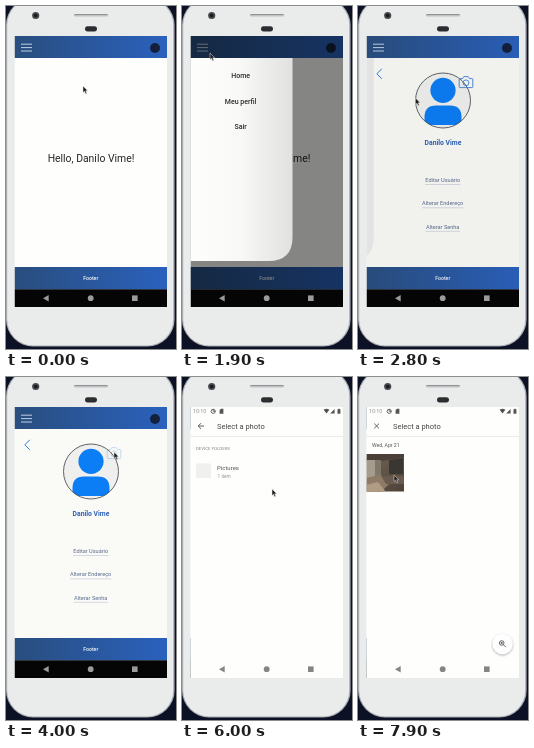
An HTML page that plays this animation: 170 by 343 pixels, repeating every 8000 ms.

```html
<!DOCTYPE html>
<html lang="pt">
<head>
<meta charset="utf-8">
<title>Phone app</title>
<style>
html, body { margin: 0; width: 100%; height: 100%; overflow: hidden; background: #0c1126; }
svg { display: block; width: 170px; height: 343px; }
text { font-family: Roboto, sans-serif; text-anchor: middle; }
.left { text-anchor: start; }
.menu { font-size: 7px; font-weight: 500; fill: #2b2b2b; }
.link { font-size: 5.6px; fill: #56688c; }
</style>
</head>
<body>
<svg viewBox="0 0 170 343" xmlns="http://www.w3.org/2000/svg">
<defs>
  <linearGradient id="bar"><stop offset="0" stop-color="#294e7e"/><stop offset="1" stop-color="#2a61bd"/></linearGradient>
  <linearGradient id="sheet"><stop offset="0" stop-color="#fefefc"/><stop offset=".5" stop-color="#f8f8f6"/><stop offset="1" stop-color="#e0e1e0"/></linearGradient>
  <linearGradient id="wall" x2="1" y2="1"><stop offset="0" stop-color="#71665a"/><stop offset="1" stop-color="#4d4036"/></linearGradient>
  <filter id="soft" x="-50%" y="-50%" width="200%" height="200%"><feGaussianBlur stdDeviation="1.2"/></filter>
  <clipPath id="screen"><rect x="8.5" y="30" width="152.5" height="271"/></clipPath>
  <clipPath id="face"><circle cx="85" cy="94.5" r="27.5"/></clipPath>
  <clipPath id="shot"><rect x="8.5" y="77" width="37.5" height="37.5"/></clipPath>
  <g id="keys">
    <path d="M37 292.3l5.7-3.3v6.6z"/><circle cx="84.7" cy="292.2" r="2.9"/><rect x="126" y="289.4" width="5.6" height="5.6"/>
  </g>
</defs>

<!-- phone body -->
<rect width="170" height="343" fill="#0c1126"/>
<rect x="0" y="-8" width="168.6" height="348.5" rx="27" fill="#a9acb0"/>
<rect x="1.2" y="-7" width="166" height="346.5" rx="26" fill="#eaecec"/>
<circle cx="29.7" cy="9.5" r="3.6" fill="#45484c"/>
<circle cx="29.7" cy="9.5" r="1.8" fill="#17191d"/>
<rect x="68" y="8" width="34" height="2.6" rx="1.3" fill="#bfc2c3"/>
<rect x="68.5" y="8" width="33" height="1" rx=".5" fill="#8f9294"/>
<rect x="79" y="20.2" width="12" height="5.2" rx="2.6" fill="#2b2d31"/>

<g clip-path="url(#screen)">
  <rect x="8.5" y="30" width="152.5" height="271" fill="#fefefc"/>
  <g id="home">
    <text x="85" y="156.3" font-size="10.4" fill="#262626">Hello, Danilo Vime!</text>
  </g>
  <g id="profile">
    <rect x="8.5" y="52" width="152.5" height="209" fill="#fafaf7"/>
    <path d="M23.8 62.8l-4.9 5 4.9 5" fill="none" stroke="#2f7be0"/>
    <circle cx="85" cy="94.5" r="27.5" fill="#efefee"/>
    <g clip-path="url(#face)" fill="#0b7df5">
      <circle cx="85" cy="84.3" r="12.6"/>
      <path d="M66.5 119V111Q66.5 99.5 78 99.5H92Q103.5 99.5 103.5 111V119z"/>
    </g>
    <circle cx="85" cy="94.5" r="27.5" fill="none" stroke="#3c4048" stroke-width=".8"/>
    <g id="camera" fill="none" stroke="#3a7fd6" stroke-width=".9">
      <path d="M102 72.6h2.6l1.2-2h4.4l1.2 2h2.6q.8 0 .8.8v7.4q0 .8-.8.8h-12q-.8 0-.8-.8v-7.4q0-.8.8-.8z"/>
      <circle cx="108" cy="76.8" r="2.9"/>
    </g>
    <text x="85" y="139.3" font-size="6.8" font-weight="700" fill="#2f62b5">Danilo Vime</text>
    <text class="link" x="84.7" y="176">Editar Usuário</text>
    <text class="link" x="84.7" y="199.3">Alterar Endereço</text>
    <text class="link" x="84.7" y="222.8">Alterar Senha</text>
    <path d="M67 178.5h35.5M64 201.8h41.5M67.5 225.3h34.5" stroke="#bcc3d0" stroke-width=".6"/>
  </g>
  <rect x="8.5" y="30" width="152.5" height="22" fill="url(#bar)"/>
  <path id="burger" d="M15 38.2h11M15 41.6h11M15 45h11" stroke="#d3dced" stroke-width=".9"/>
  <circle cx="149" cy="42" r="5" fill="#14213d"/>
  <rect x="8.5" y="261" width="152.5" height="22.5" fill="url(#bar)"/>
  <text x="84.7" y="274.2" font-size="5.2" font-weight="500" fill="#f4f7fb">Footer</text>
  <rect id="shade" x="8.5" y="30" width="152.5" height="253.5"/>
  <g id="drawer">
    <path d="M8.5 52H110.5V231q0 24-24 24H8.5z" fill="url(#sheet)"/>
    <text class="menu" x="58.6" y="71.5">Home</text>
    <text class="menu" id="perfil" x="58.6" y="97.5">Meu perfil</text>
    <text class="menu" x="58.6" y="123.3">Sair</text>
  </g>
  <rect x="8.5" y="283.3" width="152.5" height="18" fill="#050505"/>
  <use href="#keys" fill="#9b9b9b"/>

  <g id="picker">
    <rect x="8.5" y="30" width="152.5" height="271.5" fill="#fefefd"/>
    <text class="left" x="11" y="36.3" font-size="5.3" fill="#8c8c8c">10:10</text>
    <g fill="none" stroke="#5b5b5b" stroke-width=".9">
      <circle cx="31.2" cy="34.3" r="2.1"/><path d="M31.2 34.3h2.2M31.2 32v2.3"/>
    </g>
    <g fill="#555">
      <path d="M37.6 33l1.4-1.3h2.4v5h-3.8z"/>
      <path d="M141.6 32.7q2.9-2 5.8 0l-2.9 3.8zM148.2 36.6h4.4v-4.5zM155.5 32.3h.8v-.6h1.3v.6h.8v4.4h-2.9z"/>
    </g>
    <g id="title">
      <path id="back" d="M22 49h-5.8m2.8-2.8l-2.8 2.8 2.8 2.8" fill="none" stroke="#505050" stroke-width=".9"/>
      <path id="close" d="M16.2 46.6l4.8 4.8m0-4.8l-4.8 4.8" stroke="#505050" stroke-width=".9"/>
      <text class="left" x="35" y="51.8" font-size="7.5" fill="#454545">Select a photo</text>
    </g>
    <path id="rule" d="M8.5 59.4H161" stroke="#e6e6e4" stroke-width=".8"/>
    <g id="folders">
      <rect id="row" x="8.5" y="80" width="152.5" height="28.7" fill="#dedfdc"/>
      <text class="left" x="14" y="73.2" font-size="4.35" fill="#858585">DEVICE FOLDERS</text>
      <rect x="14" y="86.5" width="15" height="14.5" rx=".8" fill="#f0f0ee"/>
      <text class="left" x="35" y="92.8" font-size="6" fill="#555">Pictures</text>
      <text class="left" x="35.6" y="101.3" font-size="4.7" fill="#8f8f8f">1 item</text>
    </g>
    <g id="photos">
      <text class="left" x="14" y="70.3" font-size="5.2" fill="#555">Wed, Apr 21</text>
      <g id="photo" clip-path="url(#shot)">
        <rect x="8" y="77" width="39" height="38" fill="url(#wall)"/>
        <path d="M8 77h39v3l-24 4H8z" fill="#4a4038"/>
        <path d="M8 83h9v18H8z" fill="#a59c8e"/>
        <path d="M17 83h6v17h-6z" fill="#80766a"/>
        <path d="M31 83l14-2v16H31z" fill="#3a3732"/>
        <path d="M8 101l13-3 10 3v6l-8 8H8z" fill="#8e7b67"/>
        <path d="M23 99h23v8H28z" fill="#6a5a4d"/>
        <path d="M8 108l12-3 8 10H8z" fill="#b09b84"/>
      </g>
      <circle cx="144.6" cy="268" r="10.4" fill="#000" opacity=".28" filter="url(#soft)"/>
      <circle cx="144.6" cy="267" r="10.3" fill="#fefefe"/>
      <g fill="none" stroke="#555" stroke-width=".9">
        <circle cx="143.7" cy="266" r="2.3"/><path d="M145.4 267.7l2.5 2.5M142.6 266h2.2M143.7 264.9v2.2"/>
      </g>
    </g>
    <use href="#keys" fill="#858585"/>
  </g>
</g>
<path id="cursor" d="M0 0V6.6l1.5-1.3 1.1 2.5 1.2-.5-1.1-2.5h2z" fill="#1c1c1c" stroke="#e8e8e8" stroke-width=".5"/>
</svg>

<script>
const LOOP = 8000, STEP = 100;
const el = {};
document.querySelectorAll('svg [id]').forEach(n => el[n.id] = n);

// Linear interpolation through [time, value] keys
function track(t, keys, i = 1) {
  let a = keys[0];
  for (const b of keys) {
    if (t < b[0]) return t <= a[0] ? a[i] : a[i] + (b[i] - a[i]) * (t - a[0]) / (b[0] - a[0]);
    a = b;
  }
  return a[i];
}
const fade = (name, v) => el[name].setAttribute('opacity', v);
const show = (name, on) => fade(name, on ? 1 : 0);
const move = (name, x, y) => el[name].setAttribute('transform', `translate(${x} ${y})`);
const within = (t, a, b) => t >= a && t < b;

const path = [
  [0, 77, 80], [100, 77, 84], [200, 77, 84], [300, 76, 86], [500, 64, 72], [700, 45, 50],
  [900, 34, 41], [1000, 34, 41], [1200, 22, 40], [1400, 18, 40.5], [1700, 18, 40.5],
  [1900, 28, 47], [2100, 48, 78], [2300, 57.5, 92], [2800, 57.5, 92], [3000, 74, 89],
  [3300, 101, 83], [3400, 105, 78], [3500, 108, 75], [4200, 108, 75], [4400, 100, 92],
  [4600, 93, 106], [5000, 93, 106], [5400, 90, 112], [6100, 90, 112], [6300, 68, 107],
  [6600, 37, 99.5], [7300, 37, 99.5], [7500, 36, 98]
];
const slide = [
  [1500, 0], [1600, .15], [1700, .58], [1800, .88], [1900, 1], [2500, 1],
  [2600, .78], [2700, .36], [2800, .07], [2900, 0]
];

function draw(t) {
  const open = track(t, slide);
  move('drawer', -102 * (1 - open), 0);
  show('drawer', open > 0);
  fade('shade', .48 * open);
  fade('burger', within(t, 1400, 1700) ? .3 : 1);
  fade('perfil', within(t, 2500, 2700) ? .3 : 1);
  show('home', t < 2600);
  show('profile', t >= 2600);
  fade('camera', within(t, 4000, 4200) ? .3 : 1);

  const enter = track(t, [[4100, 0], [4200, .35], [4300, .75], [4400, .95], [4500, 1]]);
  fade('picker', enter);
  move('picker', 0, 18 * (1 - enter));

  const grid = track(t, [[7200, 0], [7300, .3], [7500, 1]]);
  show('title', t >= 5800);
  show('rule', t >= 6000);
  fade('back', 1 - grid);
  fade('close', grid);
  fade('folders', t < 6000 ? 0 : 1 - grid);
  fade('row', track(t, [[6700, 0], [6800, .5], [6900, 1]]));
  fade('photos', grid);
  fade('photo', track(t, [[7500, 0], [7800, 1]]));

  move('cursor', track(t, path, 1), track(t, path, 2));
}

let start;
function tick(now) {
  start ??= now;
  draw(Math.floor((now - start) % LOOP / STEP) * STEP);
  requestAnimationFrame(tick);
}
draw(0);
requestAnimationFrame(tick);
</script>
</body>
</html>
```
